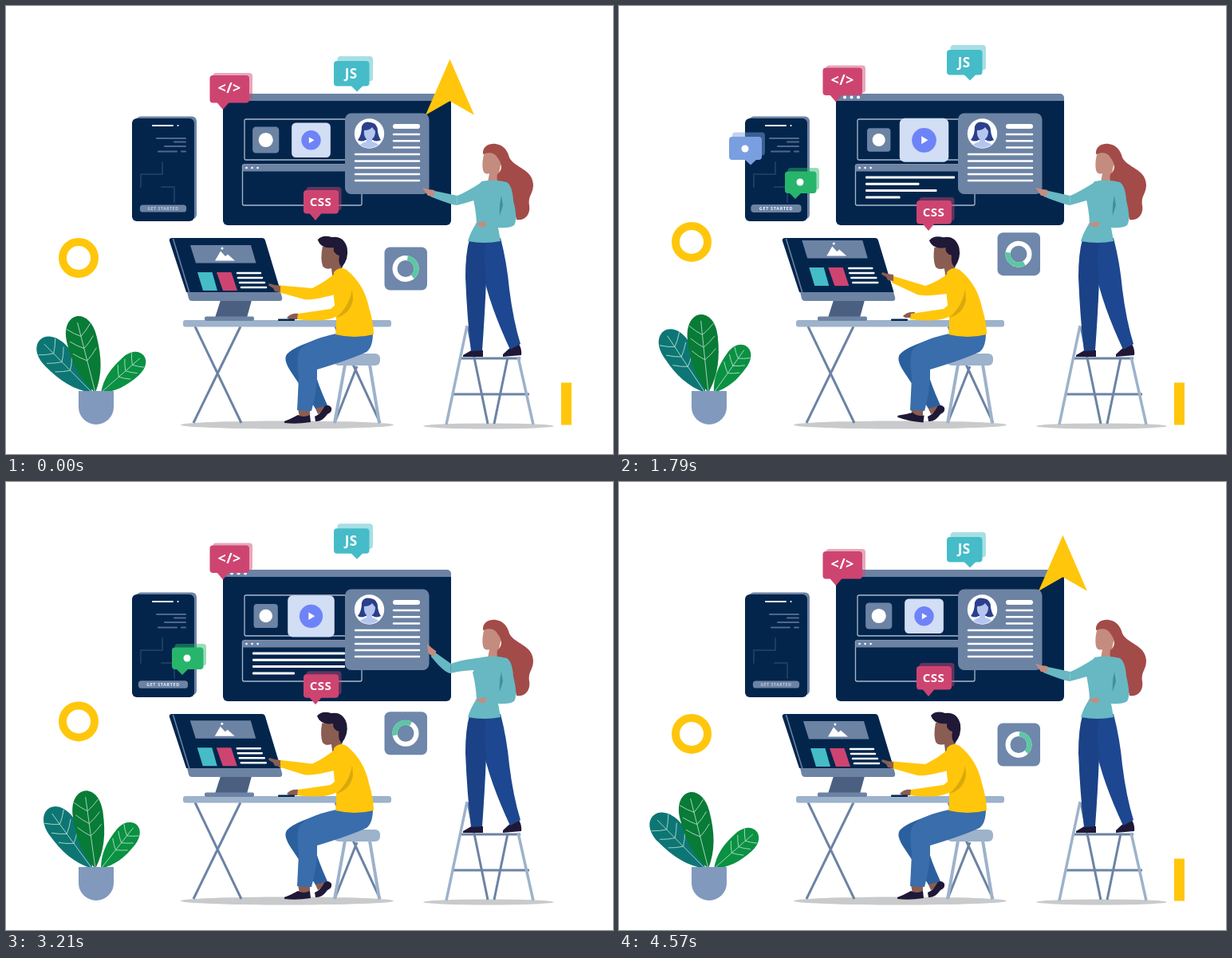
Recreate the animation shown at these times as an HTML page. Size 761 px wide and 562 px high, loop 4.64 s.

```html
<!DOCTYPE html>
<html lang="en">
<head>
<meta charset="utf-8">
<title>Design team at work</title>
<style>
  html, body { margin: 0; width: 100%; height: 100%; overflow: hidden; background: #fff; }
  svg { display: block; width: 761px; height: 562px; }
  text { font-family: "Open Sans", "Noto Sans", sans-serif; font-weight: 700; fill: #fff; text-anchor: middle; }
  .navy { fill: #03254c; }
  .slate { fill: #6c83a4; }
  .pale { fill: #9db2cb; }
  .yellow { fill: #ffc60b; }
  .white { fill: #fff; }
  .dark { fill: #1f1837; }
  .brown { fill: #8a5d52; }
  .skin { fill: #c48c7f; }
  .top { fill: #67b8c2; }
  .line { fill: none; stroke: #fff; stroke-width: 2.5; stroke-linecap: round; }
  .frame { fill: none; stroke: #a9b8ca; stroke-width: 1.3; }
  .pole { fill: none; stroke: #6c83a4; stroke-width: 3; }
  .light { stroke: #9db2cb; stroke-width: 4; }
</style>
</head>
<body>
<svg viewBox="0 0 761 562" xmlns="http://www.w3.org/2000/svg">
  <g id="ring"><circle cx="91" r="20" fill="none" stroke="#ffc60b" stroke-width="10"/></g>
  <rect id="caret" class="yellow" x="696" y="472.5" width="13" height="53"/>

  <g id="plant"></g>
  <path fill="#8199bd" d="M91 483H135V503a22 22 0 0 1-44 0Z"/>

  <!-- phone -->
  <rect class="slate" x="163" y="138.500" width="76" height="129" rx="6"/>
  <rect class="navy" x="158" y="141" width="78" height="129" rx="6"/>
  <path class="line" style="stroke-width:2" d="M184 150H209M215.500 150h.1"/>
  <path class="line" style="stroke:#50688a;stroke-width:2" d="M189 166H225M211 170.500H225M199 176H225M191 182.500H214M220 182.500H225"/>
  <path class="line" style="stroke:#1d3c60;stroke-width:2" d="M169 227V211H196V196M195 227H211V246"/>
  <g id="button">
    <rect class="slate" x="-32" y="-5" width="64" height="10" rx="4"/>
    <text id="buttonText" y="2" font-size="5.500" letter-spacing=".7">GET STARTED</text>
  </g>

  <!-- wall screen -->
  <rect class="slate" x="272" y="110" width="286" height="40" rx="5"/>
  <path class="navy" d="M272 119H558V269a6 6 0 0 1-6 6H278a6 6 0 0 1-6-6Z"/>
  <path class="line" style="stroke-width:4" d="M283 114.500h.1M291.500 114.500h.1M300 114.500h.1"/>
  <rect class="frame" x="299" y="142" width="147" height="51" rx="2"/>
  <g id="camera">
    <rect class="slate" x="-15.500" y="-15.500" width="31" height="31" rx="4"/>
    <circle class="white" r="8.500"/>
  </g>
  <g id="player">
    <rect fill="#d1def4" x="-28" y="-25" width="56" height="50" rx="6"/>
    <circle fill="#6f83f8" r="14"/>
    <path class="white" d="M-3-4.500L4.500 0L-3 4.500Z"/>
  </g>
  <rect class="frame" x="296.500" y="199" width="149.500" height="51" rx="2"/>
  <path class="slate" d="M296.500 199H446V207.500H296.500Z"/>
  <path class="line" d="M301.500 203h.1M308.500 203h.1M315.500 203h.1"/>
  <g id="typing"></g>

  <!-- profile card -->
  <rect class="slate" x="425" y="134.500" width="105.500" height="101.500" rx="8"/>
  <circle class="white" cx="455.500" cy="160" r="18.700"/>
  <path fill="#2b3f8c" d="M446 151Q449 144 457 146Q466 147 466 157Q467 164 470 168Q464 171 460 168H451Q446 171 441 168Q446 162 446 151Z"/>
  <path fill="#b4c5ef" d="M449 156Q456 156 459 152L463 157Q463 164 459 167V170Q465 172 467 174Q455 182 444 174Q446 172 452 170V167Q448 163 449 156Z"/>
  <path class="line" style="stroke-width:6" d="M488 151H516"/>
  <path class="line" d="M486 161H518M486 169.300H518M486 177.500H518M438 186H518M438 194.500H518M438 203H518M438 211H518M438 219H518"/>

  <g id="bubbles"></g>
  <path id="arrow" class="yellow" d="M0-35L30.500 35L0 17.500L-30.500 35Z"/>

  <g id="donut">
    <rect fill="#6e87ab" x="-26.500" y="-27" width="53.500" height="54" rx="7"/>
    <g fill="none" stroke-width="6">
      <circle r="13.500" stroke="#fff"/>
      <circle id="arc" r="13.500" stroke="#5cc7a4" pathLength="360" stroke-dasharray="130 230"/>
    </g>
  </g>

  <!-- desk and computer -->
  <ellipse fill="#c9cacb" cx="352.500" cy="525.500" rx="133.500" ry="5"/>
  <path class="pole" d="M237 402L295 523M294 402L235 523M413 402L469 523M440 452L412 523"/>
  <path class="pole light" d="M425 450L412 523M456 450L468 523"/>
  <rect class="pale" x="411" y="436" width="58" height="15" rx="6"/>
  <rect class="pale" x="222" y="394" width="261" height="8.500" rx="3"/>
  <path fill="#4b6080" d="M269 369H308L302 391H262Z"/>
  <rect class="slate" x="249" y="389.500" width="62" height="5.500" rx="2"/>
  <path class="slate" d="M225 350L229 367Q230 370 233 370H343Q347 370 346 365L340 345Z"/>
  <path class="navy" d="M208 291H321Q324 291 325 294L344.500 359H226L205 295Q204 291 208 291Z"/>
  <path fill="none" stroke="#6c83a4" stroke-width="1.500" d="M209.500 292L230 360"/>
  <g id="page">
    <path class="slate" d="M231 300H307L313.500 322.500H238Z"/>
    <path class="white" d="M262 319.500L269 307.500L275 314L278 311.500L287 319.500Z"/>
    <circle class="white" cx="271" cy="304" r="1.500"/>
    <path fill="#45bcc8" d="M240 334H258.500L265 357H247Z"/>
    <path fill="#ce4471" d="M264 334H282.500L290 357H272Z"/>
    <path class="line" d="M290 335H319M291 341H321M293 347H324M295 353H326"/>
  </g>

  <!-- seated designer -->
  <path class="brown" d="M387 503L401 499L404 504L391 512ZM366 505H381V516H368Z"/>
  <path class="dark" d="M387 515Q395 512 400 501Q405 500 408 504Q409 510 403 512Q396 522 388 521Z"/>
  <path fill="#2b609f" d="M413 412Q362 425 352 437Q347 444 358 460L388 505L403 501Q391 475 385 452L440 438Z"/>
  <path fill="#396dab" d="M414 411Q372 420 367 434Q364 445 367 466L365 507L383 508Q391 480 390 456Q430 444 452 434Q460 428 460 410Z"/>
  <path id="foot" class="dark" d="M349 521Q357 518 366 513Q373 517 381 513L382 522Q364 525 349 523Z"/>
  <g id="head">
    <path class="brown" d="M397 302Q394 317 397 326Q400 331 408 329L409 338Q419 339 422 327V302Z"/>
    <path class="dark" d="M391 293Q397 286 409 290Q424 288 428 304Q430 317 421 328Q416 323 418 313Q410 311 411 303Q395 305 391 293Z"/>
  </g>
  <path id="reach" class="yellow"/>
  <path id="hand" class="brown" d="M344 351L337 350L330 348L329 350.500L335 354L337 358L344 359Z"/>
  <path class="yellow" d="M411 334Q418 326 427 331Q449 349 455 378Q461 398 461 412Q437 418 413 412Q415 397 413 380Q409 360 411 334Z"/>
  <g id="typist"><path class="brown" d="M367 386Q357 385 352 391L355 393H367Z"/></g>
  <rect class="navy" x="341" y="392.500" width="21" height="2.500" rx="1"/>
  <path class="yellow" d="M420 358Q417 374 407 380L366 386L365 393Q395 397 411 391Q433 381 437 360Z"/>
  <path fill="#d9a90d" d="M434 355Q431 376 414 391Q432 386 435 368Z"/>

  <!-- ladder -->
  <ellipse fill="#c9cacb" cx="605" cy="527" rx="82" ry="3.500"/>
  <path class="pole" d="M579 402L604 524M629 441L612 524M570 442H645M561 487H656"/>
  <path class="pole light" style="stroke-width:3.500" d="M578 401L552 525M642 440L661 525"/>

  <!-- standing designer -->
  <path class="dark" d="M573 438Q580 434 585 431L598 432V440H573ZM623 437Q628 432 633 428L643 424Q647 431 646 438L623 440Z"/>
  <path fill="#1d4790" d="M596 293L620 291Q628 322 631 355Q636 395 645 424L632 431Q606 375 598 335Z"/>
  <path fill="#1b4286" d="M581 293L602 291Q598 320 602 345Q600 392 597 432L583 433Q578 390 576 340Q576 310 581 293Z"/>
  <g id="face">
    <path class="skin" d="M600 183Q596 196 598 206Q600 212 606 210L604 221L620 222Q616 206 622 196L616 181Z"/>
    <path fill="#a34b49" d="M598 186C597 176 606 172 614 173C623 174 629 181 631 190C637 203 660 204 661 224C661 236 654 238 656 250C658 262 650 270 640 268C637 253 632 246 626 240C619 230 614 220 616 211C624 205 621 196 616 190C613 184 606 183 598 186Z"/>
  </g>
  <path id="upperArm" class="top"/>
  <path id="foreArm" class="top"/>
  <g id="pointer"><path class="skin" d="M-13-7L-5-5L2-4L2 4L-6 3Z"/></g>
  <path class="top" d="M596 220Q612 217 628 221Q635 226 636 244Q642 267 637 275Q631 279 617 278L620 295Q600 299 579 295Q582 284 590 272Q589 254 585 239Z"/>
  <path id="fold" class="skin" d="M588 273L602 270L601 277L595 277Z"/>
  <path fill="#3b8fa0" d="M621 238Q618 250 619 263L623 250Z"/>
</svg>
<script>
const LOOP = 4640, STEPS = 65;
const $ = id => document.getElementById(id);
const clamp = x => Math.max(0, Math.min(1, x));
const ease = (t, from, to) => { const x = clamp((t - from) / (to - from)); return x * x * (3 - 2 * x); };
const set = (id, name, value) => $(id).setAttribute(name, value);
const move = (id, value) => set(id, "transform", value);

const leaves = [
  { id: "leafLeft", x: 108, length: 93, half: 18.5, color: "#0d7675", angle: -38.3, swing: -6.3 },
  { id: "leafMid", x: 112, length: 98.5, half: 19, color: "#087b36", angle: -9.5, swing: -4.8 },
  { id: "leafRight", x: 119, length: 71, half: 15, color: "#0a9142", angle: 41, swing: 7.6 }
];
$("plant").innerHTML = leaves.map(({ id, length: l, half: w, color }) => {
  const side = s => [0.42, 0.58, 0.74].map(k =>
    `M0 ${-l * k}Q${s * w * .4} ${-l * (k + .05)} ${s * w * .8} ${-l * (k + .13)}`).join("");
  return `<g id="${id}"><path fill="${color}" d="M0 0C${-w * .75} ${-l * .2} ${-w} ${-l * .42} ${-w} ${-l * .7}
    C${-w} ${-l * .9} ${-w * .5} ${-l} 0 ${-l}C${w * .5} ${-l} ${w} ${-l * .9} ${w} ${-l * .7}
    C${w} ${-l * .42} ${w * .75} ${-l * .2} 0 0Z"/>
    <path fill="none" stroke="#a9d6c4" stroke-width=".9" d="M0 0V${-l * .92}${side(-1)}${side(1)}"/></g>`;
}).join("");

const bubble = (id, x, y, w, h, tail, drop, color, dx, dy, content) => `<g id="${id}" fill="${color}">
  <rect x="${x + dx}" y="${y + dy}" width="${w}" height="${h}" rx="4" opacity=".47"/>
  <rect x="${x}" y="${y}" width="${w}" height="${h}" rx="4"/>
  <path d="M${tail - 8} ${y + h - 1}H${tail + 8}L${tail} ${y + h + drop}Z"/>${content}</g>`;
const label = (x, y, size, text) =>
  `<text x="${x}" y="${y}" font-size="${size}" letter-spacing=".4">${text}</text>`;
const badge = (x, y) => `<circle class="white" cx="${x}" cy="${y}" r="4.5"/>`;
$("bubbles").innerHTML =
  bubble("tag", 255.5, 81.5, 49.5, 34.5, 272, 8.5, "#ce4471", 4, -3, label(280.2, 103.5, 18, "&lt;/&gt;")) +
  bubble("js", 411, 61, 44.5, 31.5, 440, 7, "#45bcc8", 4.5, -6, label(432.7, 82.5, 17, "JS")) +
  bubble("css", 373, 238.5, 44, 29.5, 388, 8.5, "#ce4471", 3.5, -4, label(394.5, 258, 15, "CSS")) +
  bubble("blue", 138, 164, 41, 29, 165, 6.5, "#7a9fe0", 4, -5.5, badge(158, 179)) +
  bubble("green", 208, 207.5, 39.5, 27.5, 221, 7, "#27b56b", 3.5, -4.5, badge(227, 221));

const codeLines = [[540, 116], [1035, 116], [790, 116], [1300, 53]];
$("typing").innerHTML = codeLines.map((_, i) =>
  `<rect id="code${i}" class="white" x="309" y="${213.5 + i * 8.3}" height="3" rx="1"/>`).join("");

function popBubble(id, x, y, scale, turn) {
  move(id, `translate(${x} ${y}) rotate(${turn * (1 - scale)}) scale(${scale}) translate(${-x} ${-y})`);
  set(id, "opacity", Math.min(1, scale * 1.6));
}

function drawFloating(t, phase, c) {
  move("ring", `translate(0 ${304.5 + 11.5 * c})`);
  move("donut", `translate(501 ${319 + 10.5 * c})`);
  move("arc", `rotate(${phase * 360 - 80})`);
  move("tag", `translate(0 ${5.5 * c})`);
  move("js", `translate(0 ${8 * c})`);
  move("css", `translate(0 ${-7.5 * c})`);
  move("player", `translate(382.500 168.300) scale(${1 - .13 * c})`);
  move("camera", `translate(325.700 168) scale(${1 + .07 * c})`);
  move("button", `translate(197 254) scale(${.955 - .045 * c})`);
  set("buttonText", "opacity", .8 - .2 * c);
  for (const leaf of leaves) move(leaf.id, `translate(${leaf.x} 485) rotate(${leaf.angle + leaf.swing * c})`);

  popBubble("blue", 165, 199, ease(t, 150, 680) - ease(t, 2620, 3270), 90);
  popBubble("green", 221, 242, ease(t, 750, 1250) - ease(t, 3390, 3890), -90);

  // The arrow spins, shoots off the top, then pops back in.
  const back = t > 2500;
  const rise = back ? 0 : Math.max(0, t - 1070) ** 2 * .00027;
  const size = back ? ease(t, 4050, 4450) : 1;
  move("arrow", `translate(556.500 ${101.7 - rise}) rotate(${360 * ease(t, 0, 845)}) scale(${size})`);

  codeLines.forEach(([start, width], i) => {
    const typed = Math.min(width, Math.max(0, (t - start) * .09));
    set("code" + i, "width", typed * (1 - ease(t, 3850, 4400)));
  });
}

function drawSeated(t, phase) {
  const lift = ease(t, 50, 800) - ease(t, 2600, 3400);
  const tap = Math.max(0, -Math.cos(phase * 8 * Math.PI));
  const nod = (1 - Math.cos(phase * 6 * Math.PI + .5)) / 2;
  move("page", `translate(${-1.7 * lift} ${-6 * lift})`);
  move("hand", `translate(0 ${-14 * lift})`);
  set("reach", "d", `M414 334Q402 345 384 ${354 - 3 * lift}L343 ${350.5 - 12 * lift}L342 ${359 - 12 * lift}
    L374 ${368 - 6 * lift}Q384 ${370 - 5 * lift} 419 360Z`);
  move("head", `rotate(${-7 * nod} 412 332)`);
  move("foot", `rotate(${14 * tap} 380 520)`);
  move("typist", `translate(${4 * tap} ${-2 * tap})`);
}

function drawStanding(t) {
  const lean = ease(t, 100, 500) - ease(t, 700, 1400);
  const up = ease(t, 1750, 2300) - ease(t, 3800, 4400);
  const wrist = [535 + up, 235 - 20 * up], elbow = [566 - 8 * up, 242 - 10 * up];
  move("face", `rotate(${-9 * lean} 612 220)`);
  move("fold", `translate(${-12 * lean} ${-14 * lean})`);
  move("pointer", `translate(${wrist}) rotate(${28 * up})`);
  set("foreArm", "d", `M${wrist[0] - 2} ${wrist[1] - 4}L${elbow[0]} ${elbow[1] - 4}
    L${elbow[0] - 1} ${elbow[1] + 8}Q${elbow[0] - 9} ${elbow[1] + 7} ${wrist[0] - 3} ${wrist[1] + 4}Z`);
  set("upperArm", "d", `M${elbow[0]} ${elbow[1] - 4}Q${elbow[0] + 12} ${elbow[1] - 9} 598 220
    L608 236Q${elbow[0] + 20} ${elbow[1] + 3} ${elbow[0] - 1} ${elbow[1] + 8}Z`);
  set("upperArm", "visibility", lean > .6 ? "hidden" : "visible");
}

function draw(now) {
  const step = Math.floor((now % LOOP + 5) * STEPS / LOOP) % STEPS;
  const phase = step / STEPS, t = phase * LOOP;
  set("caret", "visibility", step % 8 < 4 ? "visible" : "hidden");
  drawFloating(t, phase, Math.cos(phase * 2 * Math.PI));
  drawSeated(t, phase);
  drawStanding(t);
}

function tick() {
  draw(performance.now());
  requestAnimationFrame(tick);
}
tick();
</script>
</body>
</html>
```
